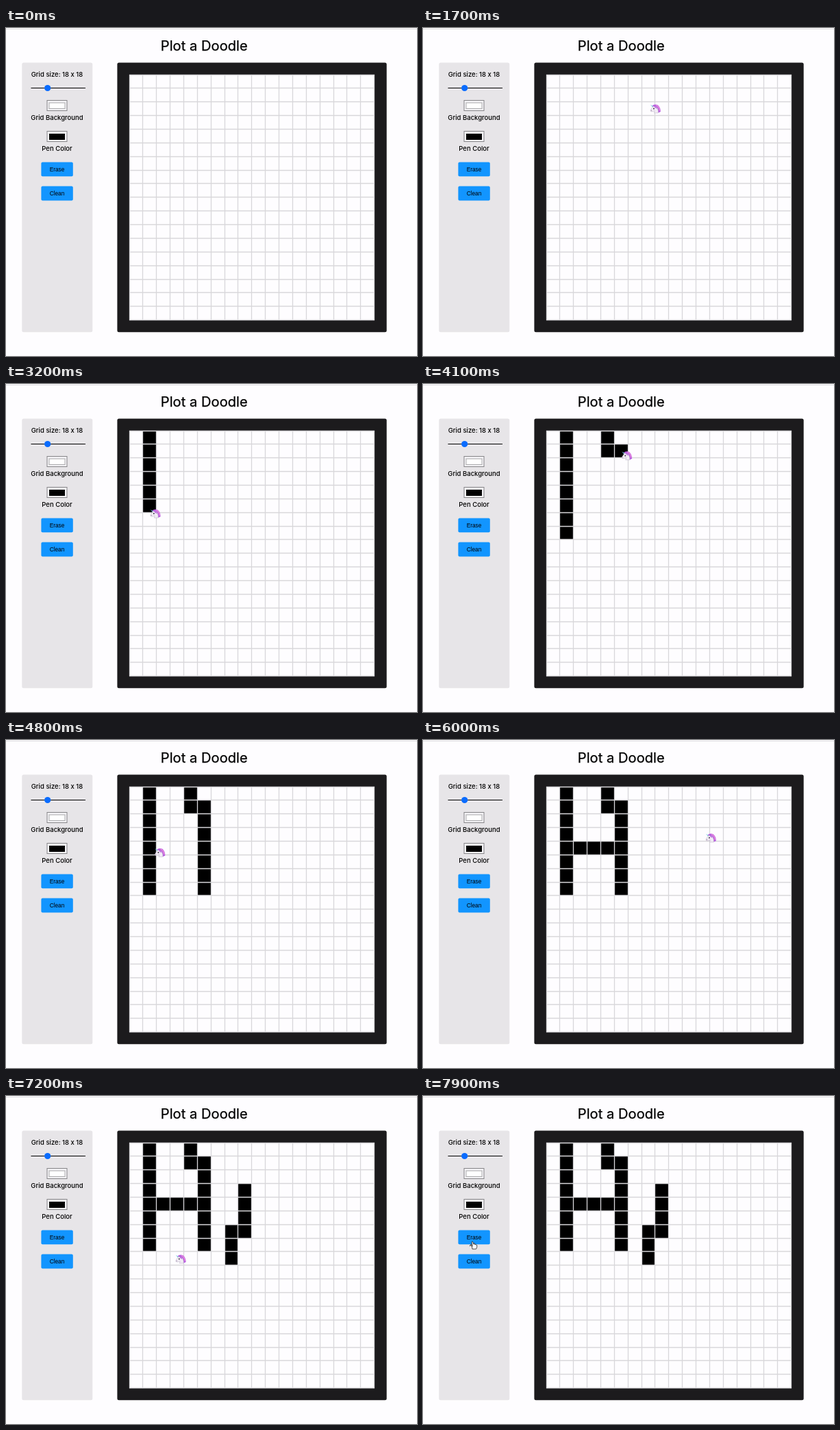
Animation of 600 by 478 pixels, one loop 8000 ms. Source, as an HTML page:

```html
<!DOCTYPE html>
<html lang="en">
<head>
<meta charset="utf-8">
<title>Grid drawing</title>
<style>
  html, body { margin: 0; width: 100%; height: 100%; overflow: hidden; background: #fefdff; }
  svg { display: block; }
  text { text-anchor: middle; font: 500 9.5px Inter, sans-serif; }
  .title { font-size: 20.2px; font-weight: 400; stroke: #000; stroke-width: .25; }
  .button text { font: 8.3px "Liberation Sans", Arial, sans-serif; }
  .button rect { fill: #1295ff; }
  .picker rect { fill: #f3f2f5; stroke: #858487; }
</style>
</head>
<body>
<svg width="600" height="478" viewBox="0 0 600 478">
  <path d="M0 1.5H600" stroke="#dddcdf"/>
  <text class="title" x="289.3" y="33">Plot a Doodle</text>

  <rect x="23.3" y="50.4" width="103" height="392.8" rx="2.5" fill="#e7e5e8"/>
  <text x="74.5" y="71">Grid size: 18 x 18</text>
  <path d="M36.5 87.5H116" stroke="#000" stroke-width="1.2"/>
  <circle cx="60.7" cy="87.5" r="4.6" fill="#0a6cff"/>
  <g class="picker">
    <rect x="60" y="105.5" width="29" height="15"/>
    <rect x="63" y="109" width="23" height="8.5" style="fill:#fff;stroke:#aaa9ac"/>
    <rect x="60" y="150.5" width="29" height="15"/>
    <rect x="63" y="154" width="23" height="9" style="fill:#000;stroke:none"/>
  </g>
  <text x="74.5" y="133.5">Grid Background</text>
  <text x="74.5" y="178.7">Pen Color</text>
  <g class="button">
    <rect x="51.4" y="195.4" width="46.4" height="20.8" rx="2"/>
    <text x="74.5" y="208.8">Erase</text>
    <rect x="51.4" y="230.6" width="46.4" height="20.8" rx="2"/>
    <text x="74.5" y="243.9">Clean</text>
  </g>

  <rect x="162.4" y="50.4" width="393.3" height="392.8" rx="2.5" fill="#1c1b1d"/>
  <rect x="180" y="68" width="358" height="357.7" fill="#fefdff"/>
  <g id="cells"></g>
  <path id="lines" stroke="#d8d7da" stroke-width="1.3"/>

  <path id="arrow" d="M0 0V11L2.6 8.7L4.3 12.4L6 11.6L4.4 8H7.8Z" fill="#000" stroke="#fff" stroke-width=".8"/>
  <path id="hand" d="M-1 .8Q0-.6 1 .8L1.7 4.2Q3 0 3.6 4.5Q5 3.6 5.3 5Q6.8 4.4 6.8 6.2Q7 9 5.5 11H0Q-1 0-3.6 6.6Q-3.4 4.8-1 6.4L.2 6.7Z"
    fill="#fff" stroke="#222" stroke-width=".8" stroke-linejoin="round"/>
  <g id="unicorn">
    <path d="M4 2Q8-.6 12 1.4Q16 5 15.8 11L12.5 12.6Q11 7 4 4Z" fill="#b65be0"/>
    <path d="M9 1.4Q13.6 3 14.6 9.5" fill="none" stroke="#ee8fdc" stroke-width="1.4"/>
    <path d="M1 .8L5.4 3.2L4.2 4.6Z" fill="#6fc9de"/>
    <path d="M4.8 3.2Q9 2.4 11 5.5Q13 9 12.4 12.8H6.4L7.4 9.6L3 11Q.4 10.8 1.2 8.6Z" fill="#f2edf5" stroke="#b5abc0" stroke-width=".5"/>
    <path d="M5.6 2.4Q10 2.4 10.4 7Q8 5.8 5.6 2.4Z" fill="#b968dd"/>
    <circle cx="6" cy="6.6" r="1" fill="#3c3048"/>
    <circle cx="2.4" cy="9.2" r=".6" fill="#8b7198"/>
  </g>
</svg>
<script>
const LOOP = 8000, STEP = 100, COUNT = 18, LEFT = 180, TOP = 68, SIZE = 19.87;
const byId = id => document.getElementById(id);
const keys = [], cells = [];

function moveTo(time, x, y) {
  keys.push({ time, x, y });
}

function addCell(time, col, row) {
  const rect = document.createElementNS("http://www.w3.org/2000/svg", "rect");
  const attrs = { x: LEFT + SIZE * col, y: TOP + SIZE * row, width: SIZE, height: SIZE };
  for (const name in attrs) rect.setAttribute(name, attrs[name]);
  byId("cells").append(rect);
  cells.push({ rect, time });
}

// Moves the pointer between two cell centres and fills each cell as it gets there.
function stroke(start, end, [c0, r0], [c1, r1]) {
  const steps = Math.max(Math.abs(c1 - c0), Math.abs(r1 - r0));
  for (let i = 0; i <= steps; i++) {
    const k = i / steps, col = c0 + (c1 - c0) * k, row = r0 + (r1 - r0) * k;
    const time = start + (end - start) * k;
    moveTo(time, LEFT + SIZE * (col + 0.5), TOP + SIZE * (row + 0.5));
    addCell(time, Math.round(col), Math.round(row));
  }
}

moveTo(0, 552, 480);
moveTo(400, 586, 466);
moveTo(600, 586, 480);
moveTo(1500, 592, 464);
moveTo(1700, 331, 111);
moveTo(2100, 209, 90);
moveTo(2400, 209, 90);
stroke(2600, 3400, [1, 0], [1, 7]);
stroke(3800, 3900, [4, 0], [4, 1]);
stroke(4100, 4500, [5, 1], [5, 7]);
stroke(4750, 5350, [1, 4], [5, 4]);
moveTo(6000, 412, 136);
stroke(6630, 6885, [7.65, 3], [7.65, 6]);
stroke(6895, 6990, [7, 6], [7, 8]);
moveTo(7700, 51, 217);
moveTo(7900, 72, 212);

let lines = "";
for (let i = 0; i <= COUNT; i++) {
  const x = Math.floor(LEFT + i * SIZE) + 0.5, y = Math.floor(TOP + i * SIZE) + 0.5;
  lines += `M${x} ${TOP}v357.7M${LEFT} ${y}h358`;
}
byId("lines").setAttribute("d", lines);

function pointerAt(t) {
  const next = keys.findIndex(key => key.time > t);
  if (next < 0) return keys[keys.length - 1];
  const a = keys[next - 1], b = keys[next];
  const k = (t - a.time) / (b.time - a.time);
  return { x: a.x + (b.x - a.x) * k, y: a.y + (b.y - a.y) * k };
}

function pointerKind(x, y) {
  const inside = (l, t, r, b) => x >= l && x <= r && y >= t && y <= b;
  if (inside(180, 68, 538, 426)) return "unicorn";
  return inside(51, 195, 98, 217) || inside(51, 230, 98, 252) ? "hand" : "arrow";
}

function draw(now) {
  const t = Math.floor(now % LOOP / STEP) * STEP;
  for (const { rect, time } of cells) rect.style.display = t >= time ? "" : "none";
  const { x, y } = pointerAt(t), kind = pointerKind(x, y);
  for (const id of ["arrow", "hand", "unicorn"]) {
    byId(id).style.display = id === kind ? "" : "none";
  }
  byId(kind).setAttribute("transform", `translate(${x} ${y})`);
}

let start;
function tick(now) {
  start ??= now;
  draw(now - start);
  requestAnimationFrame(tick);
}
draw(0);
requestAnimationFrame(tick);
</script>
</body>
</html>
```
